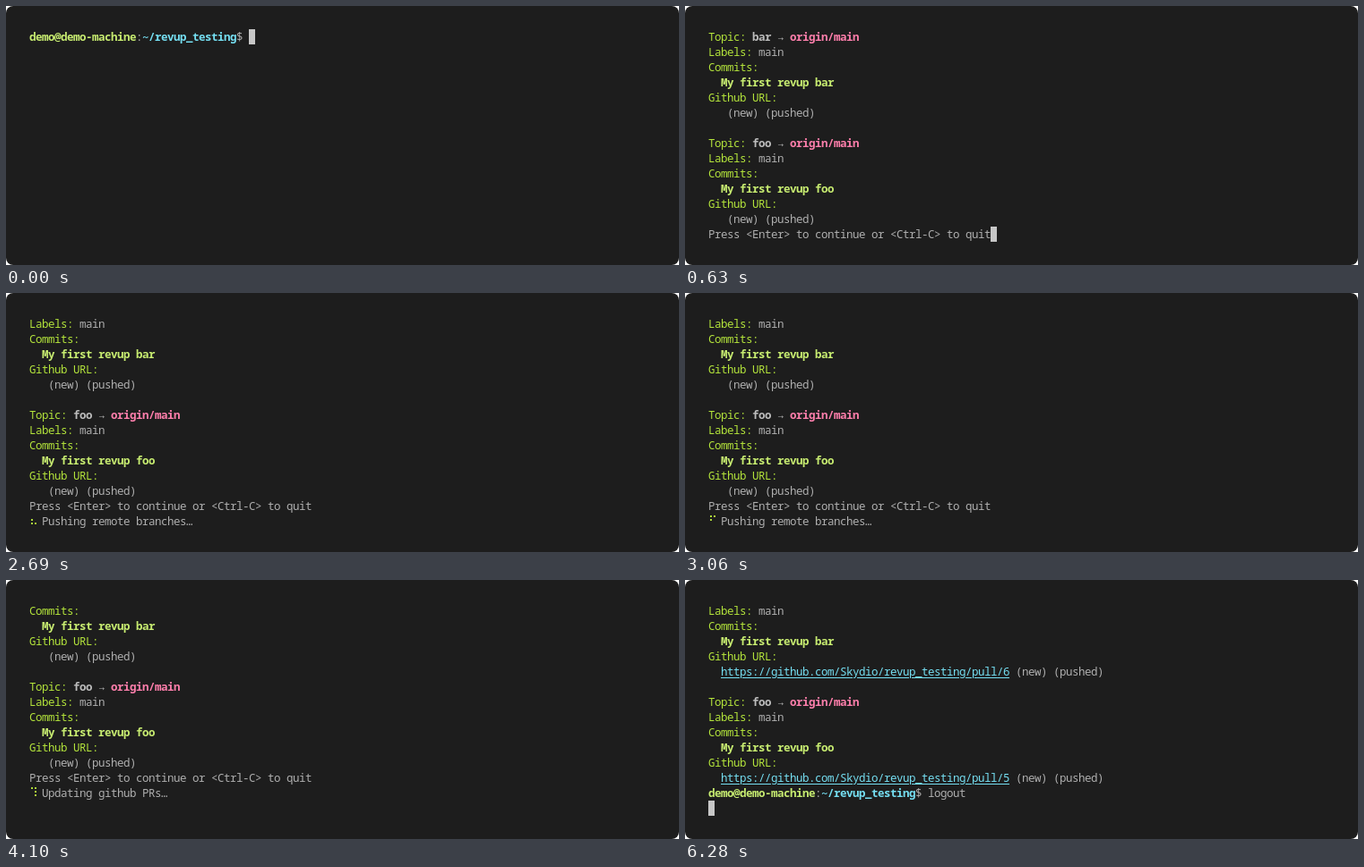
Animation of 751x290 px, one loop 6380 ms. Source, as an HTML page:

```html
<!DOCTYPE html>
<html lang="en">
<head>
<meta charset="utf-8">
<title>Terminal</title>
<style>
  html, body { margin: 0; width: 100%; height: 100%; overflow: hidden; background: #fff; }
  #term {
    box-sizing: border-box; width: 751px; height: 290px; padding: 26px;
    border-radius: 8px; background: #1d1d1d; color: #afafaf; overflow: hidden;
    font: 12.5px/17px "Noto Sans Mono", "DejaVu Sans Mono", monospace;
    letter-spacing: calc(7px - .6em);
    font-variant-ligatures: none;
  }
  #term div { height: 17px; white-space: pre; }
  b { color: #bcbcbc; }
  .green { color: #b3e33b; }
  .lime { color: #c8ed71; }
  .pink { color: #ff7fac; }
  .blue { color: #75dff2; }
  u { color: #75dff2; text-underline-offset: 2px; }
  .cursor, .spin { display: inline-block; width: 7px; height: 17px; vertical-align: top; }
  .cursor { background: #c7c7c7; }
  .spin { position: relative; }
  .spin i { position: absolute; width: 2px; height: 2px; border-radius: .5px; background: #b3e33b; }
</style>
</head>
<body>
<div id="term"></div>
<script>
const LOOP = 6380, TICK = 80, ROWS = 14;
const term = document.getElementById('term');

const span = (cls, text) => `<span class="${cls}">${text}</span>`;
const bold = (cls, text) => `<b class="${cls}">${text}</b>`;
const cursor = span('cursor', '');
const prompt = bold('lime', 'demo@demo-machine') + ':' + bold('blue', '~/revup_testing') + '$ ';
const ask = 'Press &lt;Enter&gt; to continue or &lt;Ctrl-C&gt; to quit';

const topic = (name, pull) => [
  `${span('green', 'Topic:')} <b>${name}</b> → ${bold('pink', 'origin/main')}`,
  span('green', 'Labels:') + ' main',
  span('green', 'Commits:'),
  '  ' + bold('lime', 'My first revup ' + name),
  span('green', 'Github URL:'),
  `  ${pull ? `<u>https://github.com/Skydio/revup_testing/pull/${pull}</u>` : ''} (new) (pushed)`
];
const draft = [...topic('bar'), '', ...topic('foo')];
const result = [...topic('bar', 6), '', ...topic('foo', 5)];

// Each braille character's low bits say which of its six dots are lit.
const spinner = '⠋⠙⠹⠸⠼⠴⠦⠧⠇⠏';
function status(text, elapsed) {
  const bits = spinner.charCodeAt(Math.floor(elapsed / TICK) % spinner.length) - 0x2800;
  let dots = '';
  for (let i = 0; i < 6; i++) {
    if (bits >> i & 1) {
      dots += `<i style="left:${i < 3 ? 2 : 6}px;top:${2 + i % 3 * 4}px"></i>`;
    }
  }
  return `${span('spin', dots)} ${text}…`;
}

function screen(t) {
  const command = prompt + 'revup upload';
  if (t < 100) return [prompt + cursor];
  if (t < 180) return [command, cursor];
  if (t < 630) return [command, status('Querying github', t - 180)];
  if (t < 2130) return [...draft, ask + cursor];
  if (t < 2210) return [...draft, ask, ''];
  if (t < 3140) return [...draft, ask, status('Pushing remote branches', t - 2210)];
  if (t < 4230) return [...draft, ask, status('Updating github PRs', t - 3140), ''];
  if (t < 4280) return [...result, cursor];
  if (t < 6280) return [...result, prompt + cursor];
  return [...result, prompt + 'logout', cursor];
}

let shown;
function draw() {
  const lines = screen(performance.now() % LOOP).slice(-ROWS);
  const html = lines.map(line => `<div>${line}</div>`).join('');
  if (html !== shown) term.innerHTML = shown = html;
  requestAnimationFrame(draw);
}
draw();
</script>
</body>
</html>
```
